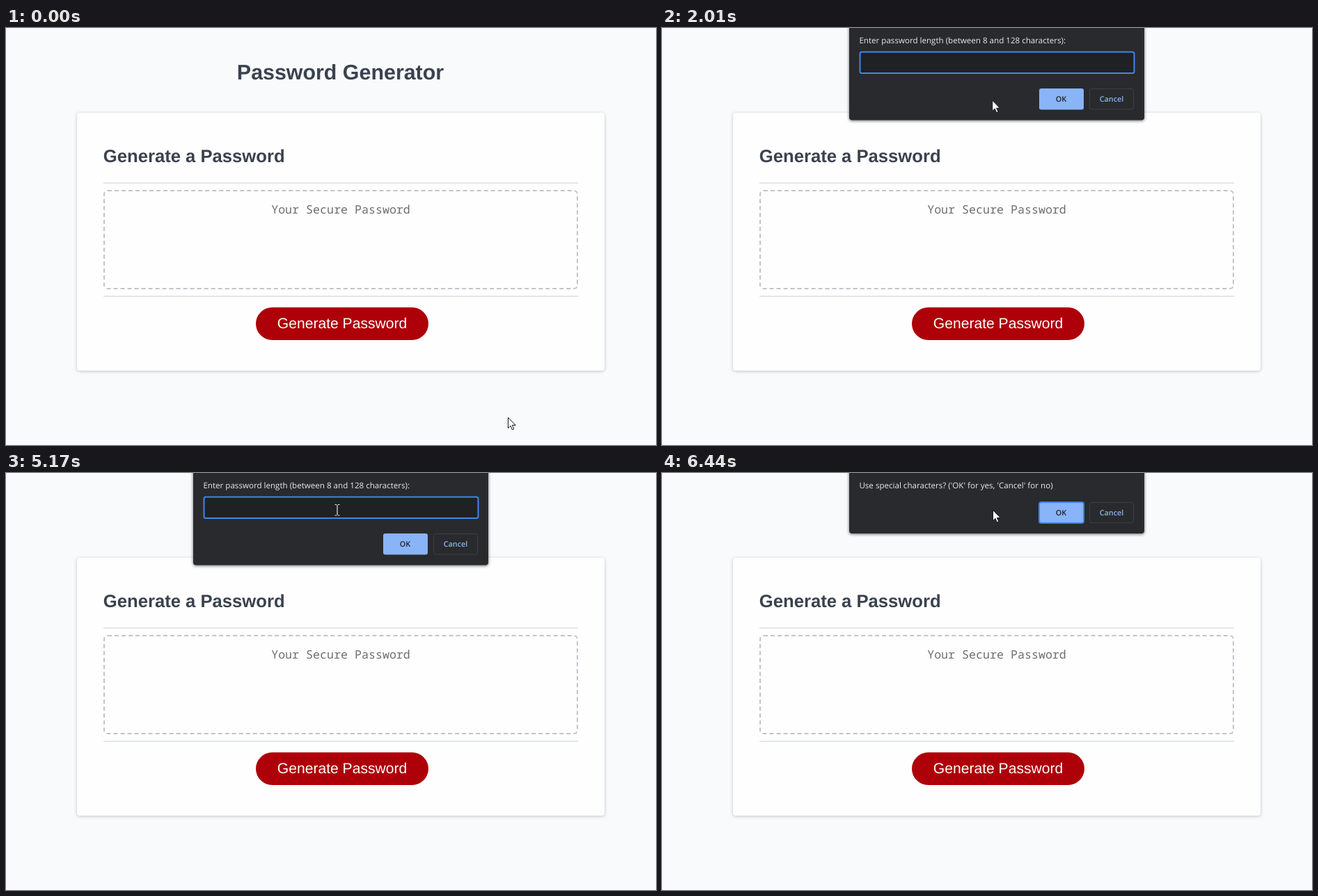
Recreate the animation shown at these times as an HTML page. Size 934 by 600 pixels, loop 8 s.

```html
<!DOCTYPE html>
<html lang="en">
<head>
<meta charset="utf-8">
<title>Password Generator</title>
<style>
  html, body { margin: 0; width: 100%; height: 100%; overflow: hidden; background: #f9fafc; }
  #stage { position: absolute; left: 0; top: 0; width: 934px; height: 600px; overflow: hidden; }
  #stage > * { position: absolute; box-sizing: border-box; }
  svg { left: 0; top: 0; text-rendering: geometricPrecision; }
  .card { left: 102px; top: 121.5px; width: 758px; height: 371px; border-radius: 4px;
    background: #fefefe; box-shadow: 0 1px 5px rgba(0, 0, 0, .22); }
  .rule { left: 140px; width: 682px; height: 2px; background: #e4e6e8; }
  .box { left: 140px; top: 233px; width: 682px; height: 143px;
    border: 2px dashed #c3c3cb; border-radius: 6px; }
  .pill { left: 359px; top: 402px; width: 248px; height: 47px; border-radius: 24px; background: #ae0009; }
  .head { font-family: "Liberation Sans", Arial, sans-serif; font-weight: 700; fill: #3a424e; }
  .label { font: 21.1px "Liberation Sans", Arial, sans-serif; fill: #fff; }
  .hint { font: 16.65px "Noto Sans Mono", monospace; fill: #6e6e6e; }
  .dialog { font: 11.6px "Open Sans", "Noto Sans", sans-serif; fill: #e8eaed; }
  .panel { fill: #292a2d; filter: drop-shadow(0 1px 2px rgba(0, 0, 0, .6)); }
  .btn { font-size: 10.8px; font-weight: 600; text-anchor: middle; }
  .mid { text-anchor: middle; }
</style>
</head>
<body>
<div id="stage">
  <div class="card"></div>
  <div class="rule" style="top:222px"></div>
  <div class="box"></div>
  <div class="rule" style="top:385px"></div>
  <div class="pill"></div>
  <svg width="934" height="600" viewBox="0 0 934 600">
    <text class="head mid" x="480.5" y="74" font-size="30.4">Password Generator</text>
    <text class="head" x="139.8" y="193.3" font-size="25.65">Generate a Password</text>
    <text class="hint mid" x="481" y="266.5">Your Secure Password</text>
    <text class="label mid" x="483" y="432.3">Generate Password</text>

    <g id="prompt" class="dialog">
      <rect class="panel" x="269" y="-20" width="424" height="152.5" rx="4"/>
      <text x="283.4" y="21.8">Enter password length (between 8 and 128 characters):</text>
      <rect id="field" x="284.5" y="34.5" width="394" height="30.5" rx="2.5" fill="#202124"/>
      <text id="typed" x="291.3" y="53.3" font-size="11" font-weight="600"></text>
      <rect id="caret" y="41" width="1" height="15" fill="#e8eaed"/>
      <g class="btn">
        <rect x="542" y="87" width="64" height="30.5" rx="3" fill="#8ab4f8"/>
        <text x="573.5" y="106" fill="#202124">OK</text>
        <rect x="614.5" y="87.5" width="63" height="29.5" rx="3" fill="none" stroke="#3c4043"/>
        <text x="646" y="106" fill="#8ab4f8">Cancel</text>
      </g>
    </g>

    <g id="confirm" class="dialog">
      <rect class="panel" x="269" y="-20" width="424" height="107" rx="4"/>
      <text x="283.4" y="21.8">Use special characters? ('OK' for yes, 'Cancel' for no)</text>
      <g class="btn">
        <rect x="542" y="42" width="64" height="30" rx="3" fill="#8ab4f8" stroke="#3f82ea" stroke-width="2"/>
        <text x="573.5" y="60.5" fill="#202124">OK</text>
        <rect x="614.5" y="42.5" width="63" height="29" rx="3" fill="none" stroke="#3c4043"/>
        <text x="646" y="60.5" fill="#8ab4f8">Cancel</text>
      </g>
    </g>

    <g id="cursor">
      <circle id="press" cx="-1.3" cy="-.6" r="11.4" fill="#fff000" fill-opacity=".5"/>
      <path id="arrow" d="M.5 .5V15.8L4 12.4 6.4 18 8.8 17 6.4 11.5H11.2Z"
        fill="#fff" stroke="#16171a" stroke-linejoin="round"/>
      <path id="hand" d="M-1.8 1Q-1.8 -.5 -.3 -.5T1.2 1V6Q3.2 5 4 6.8 6 6 6.7 7.6 9.2 7.2 9.4 9.6V14Q9.4 17.5 7.6 19V21.5H-.6V19.6L-4.8 13.6Q-6.4 11.2 -5 10.2 -3.6 9.6 -1.8 12ZM1.2 6V10.5M4 7V10.5M6.7 8V10.5"
        fill="#fff" stroke="#16171a" stroke-linejoin="round"/>
      <path id="beam" d="M-2.5 -7.5H.2M1.8 -7.5H4.5M1 -7V7.5M-2.5 8H.2M1.8 8H4.5"
        fill="none" stroke="#e2e2e2" stroke-width="1.2"/>
    </g>
  </svg>
</div>
<script>
const LOOP = 8000;
const $ = id => document.getElementById(id);
const show = (id, on) => $(id).setAttribute("visibility", on ? "visible" : "hidden");

const smooth = p => p * p * (3 - 2 * p);
const easeOut = p => 1 - (1 - p) * (1 - p);

const START = [721, 560];
const MOVES = [
  { from: 240, to: 870, steps: 10, end: [482, 422], ease: smooth },
  { from: 1670, to: 1940, steps: 5, end: [474, 122], ease: smooth },
  { from: 2010, to: 2470, steps: 7, end: [475, 53], ease: easeOut }
];

// time, opacity, vertical offset
const PROMPT = [[0, 0, -14], [1470, .4, -12], [1540, .93, -4.5], [1600, 1, 0],
  [6230, .96, -4], [6300, .5, -9], [6370, 0, -14]];
const CONFIRM = [[0, 0, -15], [6230, .09, -15], [6300, .6, -8], [6370, .95, -3], [6440, 1, 0]];
// time, caret x (0 when hidden)
const CARET = [[0, 291.5], [2010, 0], [2500, 291.5], [3030, 0], [3560, 292], [4110, 0],
  [4640, 292], [5170, 0], [5570, 298], [5700, 304], [6230, 0]];
const TYPED = [[0, ""], [5570, "1"], [5700, "16"]];

const held = (rows, t) => rows.filter(row => row[0] <= t).pop();

function pointer(t) {
  let pos = START;
  for (const m of MOVES) {
    if (t < m.from) break;
    const gap = (m.to - m.from) / (m.steps - 1);
    const n = Math.min(m.steps, Math.floor((t - m.from) / gap + 1e-6) + 1);
    const p = m.ease(n / m.steps);
    pos = pos.map((v, i) => v + (m.end[i] - v) * p);
  }
  return pos;
}

function pose(id, rows, t) {
  const [, alpha, dy] = held(rows, t);
  const scale = 1 - dy * .0008;
  $(id).setAttribute("opacity", alpha);
  $(id).setAttribute("transform", `translate(481 ${dy}) scale(${scale} 1) translate(-481 0)`);
  show(id, alpha > 0);
}

function draw(t) {
  pose("prompt", PROMPT, t);
  pose("confirm", CONFIRM, t);

  const focused = t < 6230;
  $("field").setAttribute("stroke", focused ? "#3f86ea" : "#3c4043");
  $("field").setAttribute("stroke-width", focused ? 2 : 1);
  $("typed").textContent = held(TYPED, t)[1];
  const caret = held(CARET, t)[1];
  $("caret").setAttribute("x", caret);
  $("caret").setAttribute("opacity", caret ? 1 : 0);

  const [x, y] = pointer(t);
  $("cursor").setAttribute("transform", `translate(${x} ${y})`);
  const hand = t < 1670 && x < 607 && y < 449;
  const beam = t > 1940 && focused && y < 66;
  show("hand", hand);
  show("beam", beam);
  show("arrow", !hand && !beam);
  show("press", (t >= 1200 && t < 1400) || (t >= 3030 && t < 3100));
}

let begin;
function frame(now) {
  begin ??= now;
  draw((now - begin) % LOOP);
  requestAnimationFrame(frame);
}
draw(0);
requestAnimationFrame(frame);
</script>
</body>
</html>
```
